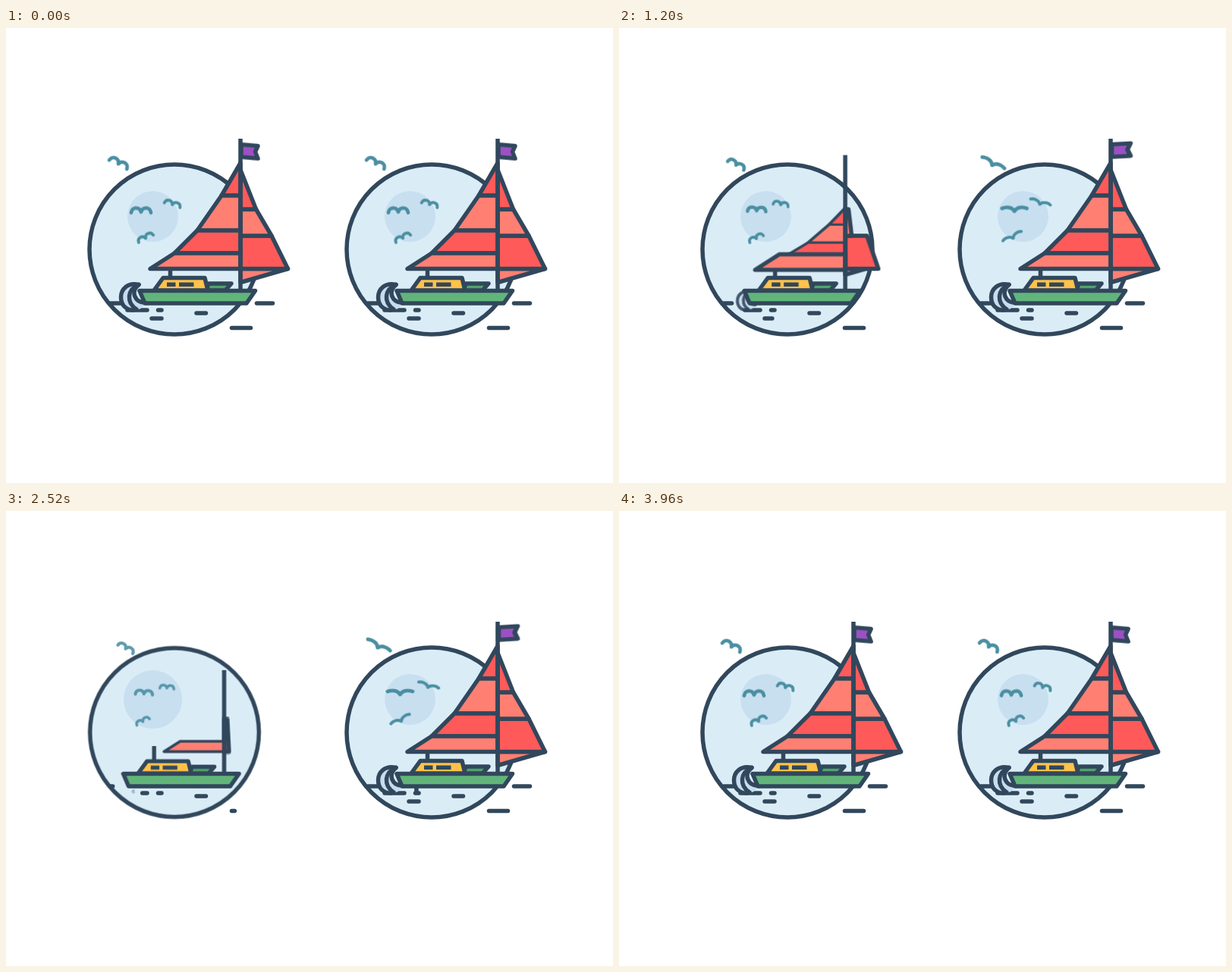
An HTML page without scripts that plays this animation: 800x600 px, repeating every 4000 ms.

```html
<!DOCTYPE html>
<html lang="en">
<head>
<meta charset="utf-8">
<title>Sailing boats</title>
<style>
html, body { margin: 0; width: 100%; height: 100%; overflow: hidden; background: #fff; }
svg { display: block; width: 800px; height: 600px; }

.ink { stroke: #31475c; stroke-width: 5.5; stroke-linejoin: round; stroke-linecap: round; fill: none; }
.ink * { vector-effect: none; }
.red { fill: #ff5a5a; }
.pale { fill: #ff7f73; }
.bird {
  fill: none; stroke: #4a8fa1; stroke-width: 4.8; stroke-linecap: round; stroke-linejoin: round;
  d: path("M-13 4C-12 -4 -2 -4 0 3C2 -4 12 -4 13 4");
}
.drop { stroke-dasharray: 22 400; stroke-dashoffset: 30; }

/* Idle motion */
.wave-flag { transform-origin: 309px 162px; animation: wave 1s infinite; }
@keyframes wave {
  0%, 100% { transform: skewY(5deg); }
  28%, 54% { transform: scaleX(1.14) skewY(-4deg); }
  88% { transform: scaleX(1.06) skewY(1deg); }
}
.right .bird { animation: flap 1s infinite; }
@keyframes flap {
  28%, 52% { d: path("M-16.5 -1C-10 -3.5 -3 -2 0 3C3 -2 10 -3.5 16.5 -1"); }
  88% { d: path("M-14 3C-12 -4 -2 -4 0 3C2 -4 12 -4 14 3"); }
}
.right .drift { animation: drift 1s ease-in-out infinite alternate; }
@keyframes drift { to { transform: translate(var(--dx), var(--dy)); } }
.right .drop { animation: splash 2s linear infinite; }
@keyframes splash {
  0%, 4%, 74% { stroke-dashoffset: 30; }
  6%, 76% { stroke-dashoffset: 2; }
  26%, 96% { stroke-dashoffset: -82; }
  28%, 73.9%, 98%, 100% { stroke-dashoffset: -130; }
  73.95% { stroke-dashoffset: 30; }
}

/* Packing away and back again */
.left .act { animation: 2s linear infinite alternate both; }
.left .disc { transform-origin: 222px 292px; animation-name: disc; }
@keyframes disc {
  0%, 70% { transform: scale(1); }
  76% { transform: scale(.991); }
  84% { transform: scale(.9); animation-timing-function: cubic-bezier(.5, .2, .8, .75); }
  96% { transform: scale(.028); }
  98%, 100% { transform: scale(0); }
}
.left .moon { transform-origin: 193.5px 248.5px; animation-name: moon; }
@keyframes moon {
  0%, 62% { transform: scale(1); animation-timing-function: ease-in-out; }
  72% { transform: scale(1.16); }
  74% { transform: scale(1.15); }
  76% { transform: scale(1.12); animation-timing-function: ease-in; }
  88%, 100% { transform: scale(0); }
}
.left .drift { animation: leave 2s linear infinite alternate both; }
@keyframes leave {
  0%, 18% { transform: none; opacity: 1; }
  44% { transform: translate(var(--x1), var(--y1)); }
  70% { opacity: 1; }
  76% { transform: translate(var(--x2), var(--y2)) rotate(var(--r)) scale(.86); opacity: .85; }
  96% { transform: translate(var(--x3), var(--y3)) rotate(var(--r)) scale(.46); opacity: .15; }
  100% { transform: translate(var(--x3), var(--y3)) scale(.38); opacity: 0; }
}
.left .ship { animation-name: ship; }
@keyframes ship {
  0%, 46% { transform: none; animation-timing-function: ease-in-out; }
  74% { transform: translateX(-21.5px); }
  76% { transform: translateX(-22.5px); }
  82%, 100% { transform: translateX(-24px); }
}
.left .hull { transform-origin: 251px 363px; animation-name: hull; }
@keyframes hull {
  0%, 77% { transform: scale(1); animation-timing-function: ease-in; }
  89%, 100% { transform: scale(0); }
}
.left .cabin { transform-origin: 230px 346px; animation-name: cabin; }
@keyframes cabin {
  0%, 70% { transform: scale(1); }
  76% { transform: scale(.98, .96); }
  84%, 100% { transform: scale(.8, 0); }
}
.left .mast { transform-origin: 309px 346px; animation-name: mast; }
@keyframes mast {
  0%, 53% { transform: scaleY(1); }
  74% { transform: scaleY(.68); }
  76% { transform: scaleY(.65); }
  85%, 100% { transform: scaleY(0); }
}
.left .flag { transform-origin: 309px 162px; animation-name: flag; }
@keyframes flag {
  0%, 46% { transform: scale(1); }
  54%, 100% { transform: scaleX(0); }
}
.left .rig { animation-name: rig; }
@keyframes rig {
  0%, 29% { transform: none; }
  36% { transform: translateY(1.5px); }
  44% { transform: translateY(3px); }
  74% { transform: none; }
  76%, 100% { transform: translateY(1px); }
}
.left .upper { transform-origin: 309px 297px; animation-name: upper; }
@keyframes upper {
  0%, 45% { transform: scale(1); animation-timing-function: ease-in; }
  68% { transform: scale(.72, .02); visibility: visible; }
  69%, 100% { transform: scale(.7, 0); visibility: hidden; }
}
.left .foot { transform-origin: 309px 317px; animation-name: foot; }
@keyframes foot {
  0%, 60% { transform: scale(1); }
  74% { transform: scale(.665); }
  76% { transform: scale(.61); }
  84%, 100% { transform: scale(0); }
}
.left .jib { transform-origin: 309px 317px; }
.left .j1 { animation-name: j1; }
.left .j2 { animation-name: j2; }
.left .j3 { animation-name: j3; }
.left .j4 { animation-name: j4; }
@keyframes j1 {
  0%, 31% { transform: none; }
  36% { transform: scaleX(.93); }
  44% { transform: scaleX(.8); }
  56%, 100% { transform: scaleX(0); }
}
@keyframes j2 { 0%, 45% { transform: none; } 64%, 100% { transform: scaleX(0); } }
@keyframes j3 {
  0%, 53% { transform: none; opacity: 1; }
  74% { transform: scaleX(.1); opacity: 1; }
  76% { transform: scaleX(.05); opacity: .7; }
  78%, 100% { transform: scaleX(0); opacity: 0; }
}
@keyframes j4 { 0%, 48% { transform: none; } 70%, 100% { transform: scale(0); } }

.left .curl { transform-origin: 168px 372px; animation-name: curl; }
@keyframes curl {
  0%, 54% { transform: scale(1); opacity: 1; }
  73% { transform: scale(.14); }
  76% { transform: scale(.08); opacity: .6; }
  78%, 100% { transform: scale(0); opacity: 0; }
}
.left .drop { animation: left-splash 2s linear infinite alternate; }
@keyframes left-splash {
  0%, 22% { stroke-dashoffset: 30; }
  24% { stroke-dashoffset: 2; }
  44% { stroke-dashoffset: -78; }
  47%, 100% { stroke-dashoffset: -130; }
}
/* Each line runs back to its own start */
.line { stroke-dasharray: 1 3; }
.left .l1 { animation-name: l1; }
.left .l2 { animation-name: l2; }
.left .l3 { animation-name: l3; }
.left .l4 { animation-name: l4; }
.left .l5 { animation-name: l5; }
.left .l6 { animation-name: l6; }
@keyframes l1 { 0%, 30% { stroke-dashoffset: 0; } 36% { stroke-dashoffset: .13; } 44% { stroke-dashoffset: .38; } 60%, 100% { stroke-dashoffset: 1.01; } }
@keyframes l2 { 0%, 54% { stroke-dashoffset: 0; } 79%, 100% { stroke-dashoffset: 1.01; } }
@keyframes l3 { 0%, 54% { stroke-dashoffset: 0; } 74% { stroke-dashoffset: .76; } 76% { stroke-dashoffset: .8; } 84%, 100% { stroke-dashoffset: 1.01; } }
@keyframes l4 { 0%, 57% { stroke-dashoffset: 0; } 70%, 100% { stroke-dashoffset: 1.01; } }
@keyframes l5 { 0%, 64% { stroke-dashoffset: 0; } 74% { stroke-dashoffset: .85; } 76.5%, 100% { stroke-dashoffset: 1.01; } }
@keyframes l6 { 0%, 77% { stroke-dashoffset: 0; } 85%, 100% { stroke-dashoffset: 1.01; } }

.b1 { --dx: 5px; --dy: 2px; --x1: 2px; --y1: 1px; --x2: 10px; --y2: 3px; --x3: 29px; --y3: -2px; --r: 3deg; }
.b2 { --dx: 4.5px; --dy: -1px; --x1: 3px; --y1: -1.5px; --x2: 4px; --y2: -1px; --x3: -6.5px; --y3: 1.5px; --r: 3deg; }
.b3 { --dx: -4px; --dy: -.5px; --x1: -5px; --y1: 0px; --x2: -8px; --y2: 1px; --x3: 1px; --y3: 2px; --r: -14deg; }
.b4 { --dx: -4px; --dy: 0px; --x1: -2.5px; --y1: .5px; --x2: -3.5px; --y2: 1px; --x3: -1px; --y3: 2px; --r: 0deg; }
</style>
</head>
<body>
<svg viewBox="0 0 800 600">
  <defs>
    <g id="disc" class="ink"><circle cx="222" cy="292" r="112" fill="#daedf7"/></g>
    <circle id="moon" cx="193.5" cy="248.5" r="33.5" fill="#c8dff0"/>
    <g id="curl" class="ink">
      <path d="M175 338.500C160 335 151.500 345 151.500 355C151.500 366 159 372 168 372C178 372 182 367 184 362C172 361 164 350 175 338.500Z" fill="#c8dcee" stroke="none"/>
      <path d="M175 338.500C160 335 151.500 345 151.500 355C151.500 366 159 372 168 372"/>
      <path d="M174 339C160 344 158 362 172 371"/>
      <path d="M175 338.500C164 347 169 362 184 362.500"/>
    </g>
    <g id="hull" class="ink"><path d="M176 346.500H328.500L317 363H183Z" fill="#62b57a"/></g>
    <g id="cabin" class="ink">
      <path d="M264 346L267 337H297L289 346Z" fill="#4fa56a"/>
      <path d="M195 346L207 329.500H262L266 346Z" fill="#ffc24b"/>
      <path d="M212 335.500h11.500v5.500h-11.500zM228 335.500h19.500v5.500h-19.500z" fill="#31475c" stroke="none"/>
    </g>
    <path id="post" class="ink" d="M216.500 309V329" style="stroke-linecap:butt"/>
    <path id="mast" class="ink" d="M309 146V346" style="stroke-linecap:butt"/>
    <g id="upper" class="ink">
      <path class="red" d="M309 178L284 221H309Z"/>
      <path class="pale" d="M284 221H309V267H252Z"/>
      <path class="red" d="M252 267H309V297H222Z"/>
    </g>
    <g id="foot" class="ink"><path class="pale" d="M222 297H309V317.500H190Z"/></g>
    <g id="j1" class="ink"><path class="red" d="M309 187L329.500 239H309Z" style="vector-effect:non-scaling-stroke"/></g>
    <g id="j2" class="ink"><path class="pale" d="M309 239H329.500L350 274H309Z" style="vector-effect:non-scaling-stroke"/></g>
    <g id="j3" class="ink"><path class="red" d="M309 274H350L371.500 317.500H309Z" style="vector-effect:non-scaling-stroke"/></g>
    <g id="j4" class="ink"><path class="pale" d="M309 317.500H371.500L309 335.500Z" style="vector-effect:non-scaling-stroke"/></g>
    <g id="flag" class="ink"><path d="M310 153.500H332L328.500 161.500L332 170H310Z" fill="#9b51c4"/></g>
  </defs>

  <g class="left">
    <use href="#disc" class="act disc"/>
    <use href="#moon" class="act moon"/>
    <g transform="translate(149.500 176.500)"><g class="drift b1"><path class="bird" transform="rotate(27)"/></g></g>
    <g transform="translate(178 239.500)"><g class="drift b2"><path class="bird"/></g></g>
    <g transform="translate(220 230.500)"><g class="drift b3"><path class="bird" transform="rotate(17) scale(.83)"/></g></g>
    <g transform="translate(183 275)"><g class="drift b4"><path class="bird" transform="rotate(-27) scale(.83)"/></g></g>
    <g class="ink">
      <path class="act line l1" pathLength="1" d="M330.500 363H351.500"/>
      <path class="act line l2" pathLength="1" d="M138 363H152"/>
      <path class="act line l3" pathLength="1" d="M186 372H160"/>
      <path class="act line l4" pathLength="1" d="M192 383H205"/>
      <path class="act line l5" pathLength="1" d="M297.500 395.500H322.500"/>
      <path class="act line l6" pathLength="1" d="M251 376H263.500"/>
      <path class="act line l6" pathLength="1" d="M200.500 372H205"/>
      <path class="drop" pathLength="100" d="M179 338Q202 336 202 371"/>
    </g>
    <use href="#curl" class="act curl"/>
    <g class="act ship">
      <g class="act cabin"><use href="#post"/></g>
      <use href="#j4" class="act jib j4"/>
      <use href="#j3" class="act jib j3"/>
      <use href="#j2" class="act jib j2"/>
      <use href="#j1" class="act jib j1"/>
      <g class="act rig">
        <use href="#upper" class="act upper"/>
        <use href="#foot" class="act foot"/>
      </g>
      <g class="act flag"><use href="#flag" class="wave-flag"/></g>
      <use href="#mast" class="act mast"/>
      <use href="#cabin" class="act cabin"/>
      <use href="#hull" class="act hull"/>
    </g>
  </g>

  <g class="right" transform="translate(339 0)">
    <use href="#disc"/>
    <use href="#moon"/>
    <g transform="translate(149.500 176.500)"><g class="drift b1"><path class="bird" transform="rotate(27)"/></g></g>
    <g transform="translate(178 239.500)"><g class="drift b2"><path class="bird"/></g></g>
    <g transform="translate(220 230.500)"><g class="drift b3"><path class="bird" transform="rotate(17) scale(.83)"/></g></g>
    <g transform="translate(183 275)"><g class="drift b4"><path class="bird" transform="rotate(-27) scale(.83)"/></g></g>
    <g class="ink">
      <path d="M330.500 363H351.500M138 363H152M186 372H160M192 383H205M297.500 395.500H322.500M251 376H263.500M200.500 372H205"/>
      <path class="drop" pathLength="100" d="M179 338Q202 336 202 371"/>
    </g>
    <use href="#curl"/>
    <use href="#post"/>
    <use href="#j4"/>
    <use href="#j3"/>
    <use href="#j2"/>
    <use href="#j1"/>
    <use href="#upper"/>
    <use href="#foot"/>
    <use href="#flag" class="wave-flag"/>
    <use href="#mast"/>
    <use href="#cabin"/>
    <use href="#hull"/>
  </g>
</svg>
</body>
</html>
```
